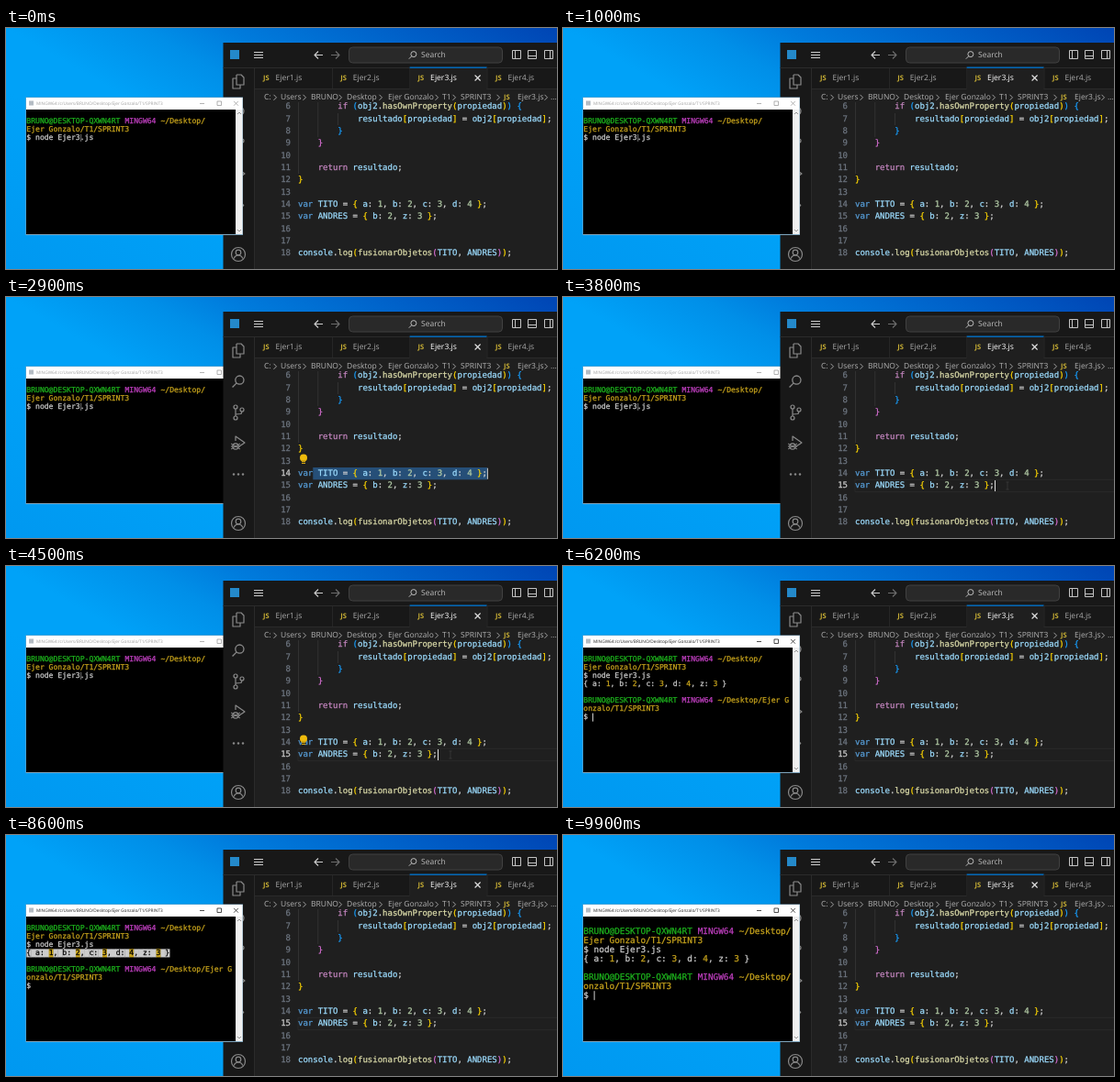
Recreate the animation shown at these times as an HTML page with a canvas. Size 600 by 263 pixels, loop 10 s.

```html
<!DOCTYPE html>
<html lang="es">
<head>
<meta charset="utf-8">
<title>Editor y terminal</title>
<style>
html, body { margin: 0; width: 100%; height: 100%; overflow: hidden; background: #0085e0; }
canvas { display: block; width: 600px; height: 263px; }
</style>
</head>
<body>
<canvas id="stage" width="600" height="263"></canvas>
<script>
const ctx = document.getElementById('stage').getContext('2d');
const LOOP = 10000;
const MONO = '"DejaVu Sans Mono", "Liberation Mono", monospace';
const SANS = '"Open Sans", "Noto Sans", sans-serif';
const ADV = 0.602; // mono advance per em

const EDIT = 1700, SELECT = 1900, CLICK = 3800, FOCUS = 5200, RUN = 5600;

const USER = 'BRUNO';
const FOLDER = 'Ejer Gonzalo';
const GREEN = '#1db41d', PINK = '#bf3fbf', GOLD = '#c8a41c', PALE = '#cccccc';
const TABS = ['Ejer1.js', 'Ejer2.js', 'Ejer3.js', 'Ejer4.js'];

// line number, indent, bracket depth at its start, text
const CODE = [
  [6, 8, 2, 'if (obj2.hasOwnProperty(propiedad)) {'],
  [7, 12, 3, 'resultado[propiedad] = obj2[propiedad];'],
  [8, 8, 3, '}'],
  [9, 4, 2, '}'],
  [10, 0, 1, ''],
  [11, 4, 1, 'return resultado;'],
  [12, 0, 1, '}'],
  [13, 0, 0, ''],
  [14, 0, 0, 'var TITO = { a: 1, b: 2, c: 3, d: 4 };'],
  [15, 0, 0, 'var ANDRES = { b: 2, z: 3 };'],
  [16, 0, 0, ''],
  [17, 0, 0, ''],
  [18, 0, 0, 'console.log(fusionarObjetos(TITO, ANDRES));']
];
const CODE_X = 318, CODE_SIZE = 9, CODE_W = CODE_SIZE * ADV;
const codeY = n => 86 + (n - 6) * 13.34;

const ramp = (t, a, b) => Math.min(1, Math.max(0, (t - a) / (b - a)));

function rect(x, y, w, h, color) {
  ctx.fillStyle = color;
  ctx.fillRect(x, y, w, h);
}

function text(s, x, y, size, color, family = SANS, align = 'left', weight = 400) {
  ctx.font = `${weight} ${size}px ${family}`;
  ctx.textAlign = align;
  ctx.fillStyle = color;
  ctx.fillText(s, x, y);
}

// Monospace text, slightly thickened
function mono(s, x, y, size, color, align) {
  text(s, x, y, size, color, MONO, align);
  ctx.strokeStyle = color;
  ctx.lineWidth = 0.25;
  ctx.strokeText(s, x, y);
}

// Polylines given as flat coordinate lists
function lines(color, width, ...paths) {
  ctx.strokeStyle = color;
  ctx.lineWidth = width;
  ctx.beginPath();
  for (const p of paths) {
    ctx.moveTo(p[0], p[1]);
    for (let i = 2; i < p.length; i += 2) ctx.lineTo(p[i], p[i + 1]);
  }
  ctx.stroke();
}

function ring(x, y, r, color, width = 1.2) {
  ctx.strokeStyle = color;
  ctx.lineWidth = width;
  ctx.beginPath();
  ctx.arc(x, y, r, 0, Math.PI * 2);
  ctx.stroke();
}

function disc(x, y, r, color) {
  ctx.fillStyle = color;
  ctx.beginPath();
  ctx.arc(x, y, r, 0, Math.PI * 2);
  ctx.fill();
}

function box(x, y, w, h, color, width = 1) {
  ctx.strokeStyle = color;
  ctx.lineWidth = width;
  ctx.strokeRect(x, y, w, h);
}

function cross(x, y, r, color, width = 1) {
  lines(color, width, [x - r, y - r, x + r, y + r], [x - r, y + r, x + r, y - r]);
}

function magnifier(x, y, r, color, width) {
  ring(x + r * 0.3, y - r * 0.3, r, color, width);
  lines(color, width, [x - r * 0.4, y + r * 0.4, x - r * 1.4, y + r * 1.4]);
}

function clipTo(x, y, w, h, draw) {
  ctx.save();
  ctx.beginPath();
  ctx.rect(x, y, w, h);
  ctx.clip();
  draw();
  ctx.restore();
}

function wallpaper() {
  const g = ctx.createLinearGradient(-113, 196, 150, -259);
  g.addColorStop(0, '#0098f0');
  g.addColorStop(0.32, '#00a2f8');
  g.addColorStop(0.43, '#00a2f8');
  g.addColorStop(0.57, '#008fe8');
  g.addColorStop(0.66, '#007bdc');
  g.addColorStop(1, '#0045b4');
  rect(0, 0, 600, 263, g);
}

function titleBar() {
  rect(244, 24, 10, 10, '#2489ca');
  for (const y of [26, 29, 32]) lines('#cccccc', 1, [270, y + 0.5, 280, y + 0.5]);
  lines('#cccccc', 1.1, [345, 29.5, 336, 29.5], [340, 25.5, 336, 29.5, 340, 33.5]);
  lines('#6c6c6c', 1.1, [354, 29.5, 363, 29.5], [359, 25.5, 363, 29.5, 359, 33.5]);
  ctx.beginPath();
  ctx.roundRect(373.5, 21, 167, 17, 4);
  ctx.fillStyle = '#292929';
  ctx.fill();
  ctx.strokeStyle = '#414141';
  ctx.lineWidth = 1;
  ctx.stroke();
  magnifier(443, 29.5, 3, '#bcbcbc', 1);
  text('Search', 452, 29.5, 8.5, '#bcbcbc');
  for (const x of [551, 568, 586]) box(x + 0.5, 24.5, 9, 9, '#c4c4c4');
  lines('#c4c4c4', 1, [554.5, 24, 554.5, 34], [568, 30.5, 578, 30.5], [592.5, 24, 592.5, 34]);
}

function activityBar() {
  const c = '#8a8a8a', x = 253;
  lines(c, 1.2, [x - 2, 51, x + 3, 51, x + 6, 54, x + 6, 62, x - 2, 62, x - 2, 51],
    [x - 2, 55, x - 6, 55, x - 6, 66, x + 2, 66, x + 2, 62]);
  magnifier(x, 92, 4.6, c, 1.3);
  ring(x - 3, 120, 2, c);
  ring(x - 3, 132, 2, c);
  ring(x + 4, 123, 2, c);
  lines(c, 1.2, [x - 3, 122, x - 3, 130], [x + 4, 125, x + 3, 127.5, x - 3, 128]);
  lines(c, 1.2, [x - 3, 157, x - 3, 152, x + 7, 159, x + 1, 163]);
  ring(x - 3, 163, 3.2, c);
  lines(c, 1, [x - 8, 160, x + 2, 166], [x - 8, 166, x + 2, 160], [x - 8, 163, x + 2, 163]);
  for (const d of [-5, 0, 5]) disc(x + d, 193.5, 1.2, c);
  ring(x, 247, 7.5, c);
  ring(x, 245, 2.8, c);
  ctx.beginPath();
  ctx.arc(x, 253, 5, Math.PI * 1.1, Math.PI * 1.9);
  ctx.stroke();
}

function jsIcon(x, y) {
  text('JS', x, y, 7.6, '#c6ad34', SANS, 'left', 700);
}

function tabs() {
  rect(271, 66, 329, 1, '#2b2b2b');
  TABS.forEach((name, i) => {
    const x = 271 + i * 84.3, on = i === 2;
    if (on) {
      rect(x, 43, 84, 24, '#1f1f1f');
      rect(x, 42.5, 84, 1.3, '#0078d4');
    }
    rect(x + 84, 43, 0.8, 24, '#2b2b2b');
    jsIcon(x + 9, 55);
    text(name, x + 22.5, 54.5, 8.6, on ? '#ffffff' : '#a8a8a8');
    if (on) cross(x + 74, 54.5, 3, '#e6e6e6', 1.1);
  });
}

function breadcrumb() {
  const parts = [['C:', 281], ['Users', 299], [USER, 332], ['Desktop', 371],
    [FOLDER, 416], ['T1', 475], ['SPRINT3', 495], ['Ejer3.js', 557]];
  for (const [s, x] of parts) text(s, x, 75.5, 8.5, '#b2b2b2');
  jsIcon(542, 76);
  for (const x of [293, 325, 364, 408, 469, 488, 536, 588])
    lines('#a0a0a0', 1, [x - 1.5, 72.8, x + 1.5, 75.8, x - 1.5, 78.8]);
  text('...', 593, 75.5, 8.5, '#b2b2b2');
}

function codeLine([n, indent, depth, src]) {
  const brackets = ['#ffd700', '#da70d6', '#179fff'];
  const tokens = /[A-Za-z]\w*|\d+|\s+|./g;
  for (const m of src.matchAll(tokens)) {
    const s = m[0];
    let color = '#d4d4d4';
    if (/^(if|return)$/.test(s)) color = '#c586c0';
    else if (s === 'var') color = '#569cd6';
    else if (/^[a-z]/i.test(s)) color = src[m.index + s.length] === '(' ? '#dcdcaa' : '#9cdcfe';
    else if (/^\d/.test(s)) color = '#b5cea8';
    else if (/[(\[{]/.test(s)) color = brackets[depth++ % 3];
    else if (/[)\]}]/.test(s)) color = brackets[--depth % 3];
    mono(s, CODE_X + (indent + m.index) * CODE_W, codeY(n), CODE_SIZE, color);
  }
}

function bulb(x, y) {
  disc(x, y - 1.5, 4, '#eebb0c');
  rect(x - 2, y + 1, 4, 4, '#d0a410');
  rect(x - 2, y + 3, 4, 0.8, '#1f1f1f');
}

function editor(t) {
  rect(236.5, 16, 363.5, 247, '#181818');
  rect(271, 67, 329, 196, '#1f1f1f');
  rect(236.5, 43, 363.5, 1, '#2b2b2b');
  rect(270, 43, 1, 220, '#2b2b2b');
  titleBar();
  activityBar();
  tabs();
  breadcrumb();

  const active = t < SELECT ? 0 : t < CLICK ? 14 : 15;
  clipTo(271, 81, 329, 182, () => {
    if (active === 14) {
      const w = 35 * CODE_W * ramp(t, SELECT, 2600);
      const x = CODE_X + 3 * CODE_W;
      rect(x, codeY(14) - 6.7, w, 13.3, '#264f78');
      rect(x + w, codeY(14) - 6, 1, 12, '#d0d0d0');
    }
    if (active === 15) box(318, codeY(15) - 6.7, 290, 13.3, '#292929');
    rect(318, 81, 0.7, 78, '#3a3a3a');
    rect(339.5, 81, 0.7, 38, '#3a3a3a');
    rect(361, 93, 0.7, 13, '#3a3a3a');
    for (const line of CODE) {
      const n = line[0];
      mono(n, 310, codeY(n), CODE_SIZE, n === active ? '#cccccc' : '#6e7681', 'right');
      codeLine(line);
    }
  });
  if (t >= 2700 && t < CLICK) bulb(324, 177);
  if (t >= 4100 && t < FOCUS) bulb(324, 190);
  if (t >= CLICK && t < FOCUS) {
    if ((t - CLICK) % 1000 < 800) rect(470, codeY(15) - 6, 1, 12, '#e0e0e0');
    lines('#3c3c3c', 0.8, [484, 202, 484, 210], [482.5, 202, 485.5, 202], [482.5, 210, 485.5, 210]);
  }
}

function termRow(row, parts, f) {
  let col = 0;
  for (const [s, color] of parts) {
    mono(s, 22.3 + col * f.w, f.y(row), f.size, color);
    col += s.length;
  }
}

const prompt = tail => [[USER + '@DESKTOP-QXWN4RT', GREEN], [' MINGW64', PINK], [' ~/Desktop/' + tail, GOLD]];

function output(f, picked) {
  const s = '{ a: 1, b: 2, c: 3, d: 4, z: 3 }';
  [...s].forEach((ch, i) => {
    const x = 22.3 + i * f.w, color = /\d/.test(ch) ? GOLD : PALE;
    const on = i < picked;
    if (on) rect(x, f.y(4) - f.pitch / 2, f.w + 0.3, f.pitch, color);
    mono(ch, x, f.y(4), f.size, on ? '#000000' : color);
  });
}

function terminal(t) {
  const focused = t >= FOCUS, done = t >= RUN;
  const zoom = t < 9200 ? 0 : t < 9500 ? 0.5 : 1;
  const size = 8.09 + zoom * 1.3, pitch = 9.05 + zoom * 0.95, top = 88.2 + zoom * 2;
  const f = { size, pitch, w: size * ADV, y: r => top + (r + 0.5) * pitch };

  rect(21.5, 75.5, 236.5, 150.5, '#7fa6bf');
  rect(22, 76, 235.5, 13, '#ffffff');
  rect(22, 89, 228, 136, '#000000');
  rect(250, 89, 7.5, 136, '#f0f0f0');
  lines('#8a8a8a', 0.9, [252, 94, 254, 92, 256, 94], [252, 220, 254, 222, 256, 220]);
  rect(25, 79.5, 5, 5, '#b4bcc4');
  const ink = focused ? '#222222' : '#a0a0a0';
  text(`MINGW64:/c/Users/${USER}/Desktop/${FOLDER}/T1/SPRINT3`, 33, 82.3, 4.75, ink);
  lines(ink, 0.8, [211, 82.5, 216, 82.5]);
  box(230, 80, 4.5, 4.5, ink, 0.8);
  cross(250.5, 82.3, 2.4, ink, 0.8);

  clipTo(22, 89, 228, 136, () => {
    termRow(1, prompt(''), f);
    termRow(2, [[FOLDER + '/T1/SPRINT3', GOLD]], f);
    termRow(3, [['$ node Ejer3.js', PALE]], f);
    if (!done) {
      rect(81.3, f.y(3) - 4, 0.8, 8, '#909090');
      return;
    }
    const picked = t < 8800 ? Math.round(32 * ramp(t, 6700, 7500)) : 0;
    output(f, picked);
    termRow(6, prompt(zoom ? '' : FOLDER.slice(0, 6)), f);
    termRow(7, [[FOLDER.slice(6) + '/T1/SPRINT3', GOLD]], f);
    termRow(8, [['$', PALE]], f);
    if (!picked && (t - RUN) % 1000 < 700)
      rect(22.3 + 2 * f.w, f.y(8) - pitch / 2, 1, pitch, '#d0d0d0');
  });
}

function frame(now) {
  const t = now % LOOP;
  ctx.textBaseline = 'middle';
  ctx.textRendering = 'geometricPrecision';
  ctx.lineJoin = 'round';
  wallpaper();
  // The window last clicked lies on top
  const editing = t >= EDIT && t < FOCUS;
  for (const draw of editing ? [terminal, editor] : [editor, terminal]) draw(t);
  requestAnimationFrame(frame);
}
requestAnimationFrame(frame);
</script>
</body>
</html>
```
